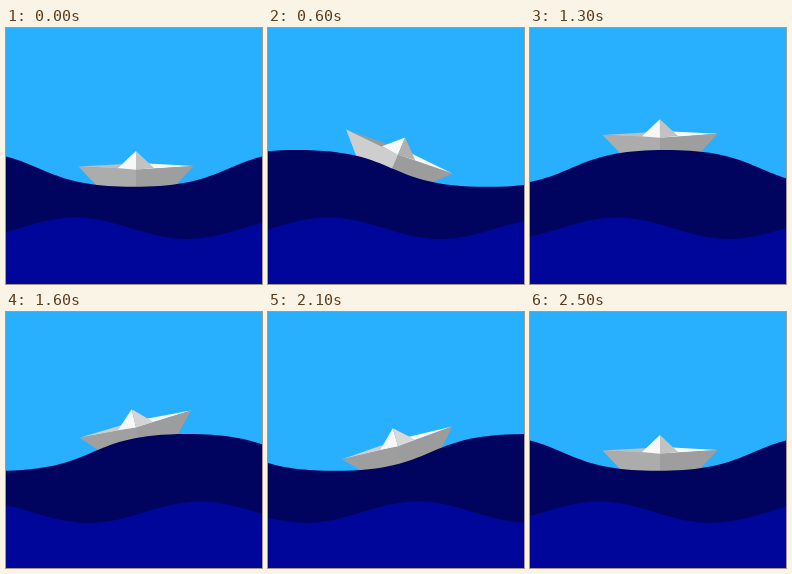
An HTML page without scripts that plays this animation: 256x256 px, repeating every 2.6 s.

```html
<!DOCTYPE html>
<html lang="en">
<head>
<meta charset="utf-8">
<title>Paper boat</title>
<style>
  @property --t {
    syntax: "<number>";
    inherits: true;
    initial-value: 0;
  }

  html, body {
    margin: 0;
    height: 100%;
    overflow: hidden;
    background: #28b0ff;
  }

  svg {
    display: block;
    width: 100%;
    height: 100%;
    /* one swell takes 25 of the 26 ticks */
    animation: swell 2.6s steps(26) infinite;
    --sin: sin(var(--t) * 1turn);
    --lean: calc(var(--sin) * max(var(--sin), 0 - var(--sin)));
    --right: max(var(--lean), 0);
    --left: max(0 - var(--lean), 0);
  }

  @keyframes swell {
    from { --t: 0; }
    to { --t: 1.04; }
  }

  .back {
    fill: #00045f;
    transform: translateX(calc(var(--t) * 380px));
  }

  .front {
    fill: #000699;
    transform: translateX(calc(var(--t) * 896px));
  }

  .boat {
    transform-origin: 130px 141.5px;
    transform:
      translateY(calc(16px * cos(var(--t) * 1turn) - 16px))
      rotate(calc(var(--lean) * 22.8deg));
  }

  .inside { fill: hsl(0 0% calc(74% - 14% * var(--right) + 10% * var(--left))); }
  .port { fill: hsl(0 0% calc(67.5% + 13.5% * var(--right) - 8% * var(--left))); }
  .starboard { fill: hsl(0 0% calc(62% - 1% * var(--right) - 1% * var(--left))); }
  .shade { fill: hsl(0 0% calc(76% - 7% * var(--right) + 12% * var(--left))); }
</style>
</head>
<body>
<svg viewBox="0 0 256 256" preserveAspectRatio="none">
  <rect width="256" height="256" fill="#28b0ff"/>
  <g class="boat">
    <path class="inside" d="M72.500 138.500 118 136 130 142z"/>
    <path fill="#f8f8f8" d="M187.500 138 142 135.500 130 142z"/>
    <path class="port" d="M72.500 138.500 130.500 141.500 130 160H93z"/>
    <path class="starboard" d="M187.500 138 130 141.500V160H167z"/>
    <path fill="#f7f7f7" d="M130 123 112 140 130 141.700z"/>
    <path class="shade" d="M130 123 148 140 130 141.700z"/>
  </g>
  <path class="back" d="M-442 122c104.500 0 85.500 36.800 190 36.800s85.500-36.800 190-36.800 85.500 36.800 190 36.800 85.500-36.800 190-36.800V256H-442z"/>
  <path class="front" d="M-1051 189.500c40.800 0 71.200 21.500 112 21.500s71.200-21.500 112-21.500 71.200 21.500 112 21.500 71.200-21.500 112-21.500 71.200 21.500 112 21.500 71.200-21.500 112-21.500 71.200 21.500 112 21.500 71.200-21.500 112-21.500 71.200 21.500 112 21.500 71.200-21.500 112-21.500 71.200 21.500 112 21.500 71.200-21.500 112-21.500V256H-1051z"/>
</svg>
</body>
</html>
```
